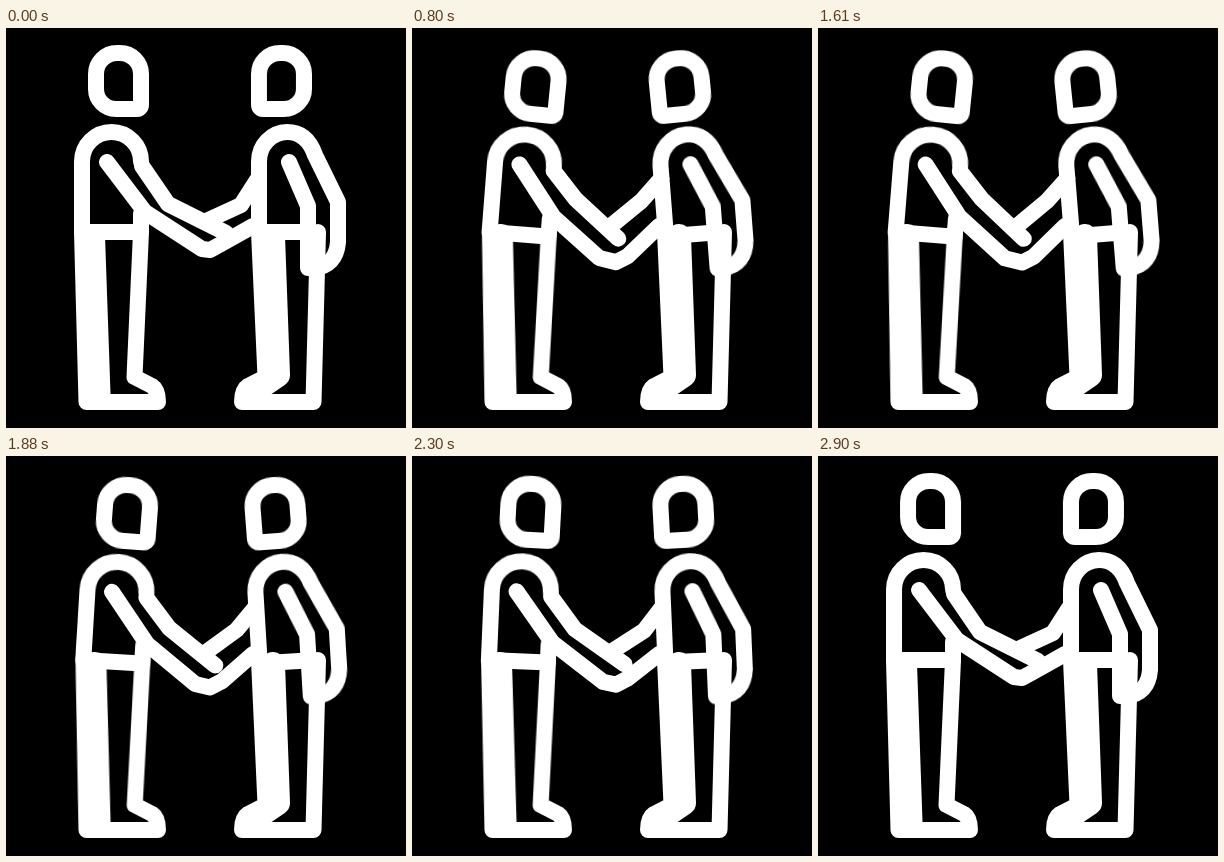
Animation, 400 px wide and 400 px high, one loop 2930 ms. Source, as an HTML page:

```html
<!DOCTYPE html>
<html lang="en">
<head>
<meta charset="utf-8">
<title>Handshake</title>
<style>
  html, body { margin: 0; width: 100%; height: 100%; overflow: hidden; background: #000; }
  svg { display: block; width: 100%; height: 100%; }
  path { fill: none; stroke: #fff; stroke-width: 16; stroke-linecap: round; stroke-linejoin: round; }
  .wide { stroke-width: 24; }

  /* Three bows of 800 ms each, after a short hold */
  .bow, .clasp { animation: bow 2930ms cubic-bezier(.35, 0, .65, 1) infinite; }
  .clasp { animation-name: clasp; }

  /* Each part turns about its own joint */
  .bow { --x: 0px; --y: 0px; --turn: 0deg; --skew: 0deg; }
  .left.head { --x: 13.5px; --y: 6.5px; --turn: 7deg; transform-origin: 112.5px 53px; }
  .right.head { --x: -9.5px; --y: 6.5px; --turn: -7deg; transform-origin: 275.5px 53px; }
  .left.torso { --x: 2px; --turn: 5.5deg; transform-origin: 76px 204px; }
  .right.torso { --x: 1px; --turn: -5.5deg; transform-origin: 309px 204px; }
  .left.legs { --skew: -.8deg; transform-origin: 76px 374px; }

  @keyframes bow {
    0%, 17.577%, 44.881%, 72.184%, 99.488%, 100% { transform: none; }
    31.229%, 58.532%, 85.836% {
      transform: translate(var(--x), var(--y)) rotate(var(--turn)) skewX(var(--skew));
    }
  }

  /* Upper edges of both arms, then the lower edge from shoulder to hand to hip */
  @keyframes clasp {
    0%, 17.577%, 44.881%, 72.184%, 99.488%, 100% {
      d: path("M136 138 L162 176 L220 205 M251 152 L235 177 L198 194 M101 134 L139 184 L196 221 L204 222 L215 216 L247 198");
    }
    31.229%, 58.532%, 85.836% {
      d: path("M143 144 L164 170 L203 212 M249 150 L228 172 L199 199 M109 137 L142 190 L185 232 L204 237 L216 231 L247 198");
    }
  }
</style>
</head>
<body>
<svg viewBox="0 0 400 400">
  <defs>
    <path id="head" d="M135 77 a4 4 0 0 1 -4 4 H110 a20 20 0 0 1 -20 -20 V46 a21 21 0 0 1 21 -21 h3 a21 21 0 0 1 21 21 Z"/>
    <path id="legs" d="M135 204 L128.5 349 L146 358 Q152 362 152 374 H80.5 L76 204"/>
  </defs>

  <g class="bow left legs">
    <use href="#legs"/>
    <path class="wide" d="M87 208 L92.5 366"/>
  </g>
  <g class="bow left torso">
    <path d="M135 186 V204 H76 V133.5 a29.5 29.5 0 0 1 59 0"/>
  </g>
  <g class="bow left head"><use href="#head"/></g>

  <use href="#legs" transform="translate(388 0) scale(-1 1)"/>
  <path class="wide" d="M267 208 L272 347 L250 362"/>
  <g class="bow right torso">
    <path d="M302 204 H253 V133.5 A28.5 29.5 0 0 1 281 104 Q301 104 309 127 L332 174 V214 Q330 238 308 240 H302 V178 L283 134"/>
  </g>
  <g class="bow right head"><use href="#head" transform="translate(388 0) scale(-1 1)"/></g>

  <path class="clasp"/>
</svg>
</body>
</html>
```
